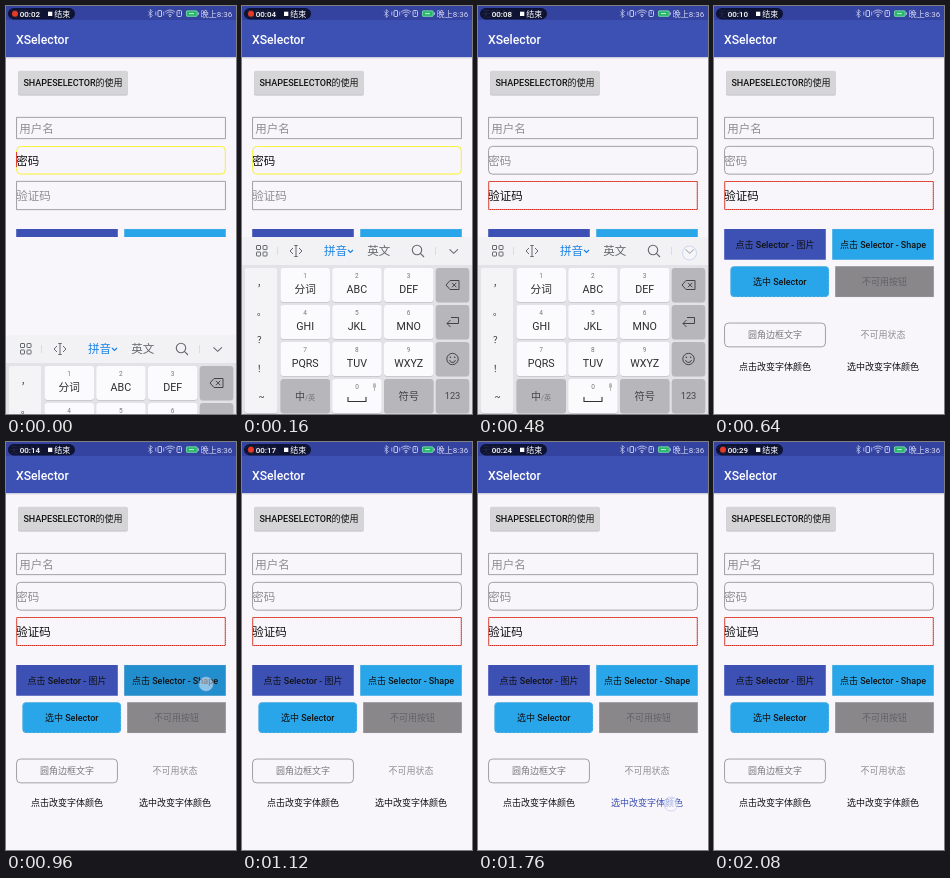
An HTML page with a canvas for the animation above (2.24 s loop, 230x408 px).

```html
<!DOCTYPE html>
<html lang="zh-CN">
<head>
<meta charset="utf-8">
<style>
html, body { margin: 0; width: 100%; height: 100%; overflow: hidden; background: #f8f6fa; }
canvas { display: block; width: 230px; height: 408px; }
</style>
</head>
<body>
<canvas id="stage"></canvas>
<script>
const W = 230, H = 408, STEP = 160, LOOP = 2240;
const FONT = 'Roboto, "Noto Sans CJK SC", "Noto Sans CJK", sans-serif';
const PAPER = '#f8f6fa', INDIGO = '#3d51b5', SKY = '#29a5e9', GREY = '#8a878b', INK = '#111';
const EDGE = '#7d7b80', THIN = 0.7;
const canvas = document.getElementById('stage');
const c = canvas.getContext('2d');
const dpr = window.devicePixelRatio || 1;
canvas.width = W * dpr;
canvas.height = H * dpr;

// One entry per step: seconds on the recorder, its dot, and what is going on.
const steps = [
  { sec: 2, dot: 1, focus: 'pass', kb: 329, caret: 1 },
  { sec: 4, dot: 1, focus: 'pass', kb: 231 },
  { sec: 6, focus: 'code', touch: [146, 191] },
  { sec: 8, focus: 'code', kb: 231, touch: [211.5, 247] },
  { sec: 10, focus: 'code' },
  { sec: 12, dot: 1, focus: 'code', press: 'image', touch: [94, 242] },
  { sec: 14, focus: 'code', press: 'shape', touch: [200, 242] },
  { sec: 17, dot: 1, focus: 'code' },
  { sec: 18, focus: 'code', press: 'select', touch: [104, 277] },
  { sec: 20, dot: 1, focus: 'code', touch: [104, 277], hatch: 1 },
  { sec: 22, focus: 'code', press: 'text1', touch: [87, 361] },
  { sec: 24, focus: 'code', press: 'text2', touch: [193, 362] },
  { sec: 26, focus: 'code', press: 'text2' },
  { sec: 29, dot: 1, focus: 'code' }
];

function text(s, x, midY, size, color, weight = 400, align = 'left') {
  c.font = `${weight} ${size}px ${FONT}`;
  c.textAlign = align;
  c.fillStyle = color;
  c.fillText(s, x, midY + size * 0.37);
}

function rect(x, y, w, h, color) {
  c.fillStyle = color;
  c.fillRect(x, y, w, h);
}

function box(x, y, w, h, r, fill, stroke, width = 1, dash = []) {
  c.beginPath();
  c.roundRect(x, y, w, h, r);
  if (fill) { c.fillStyle = fill; c.fill(); }
  if (stroke) {
    c.beginPath();
    c.roundRect(x + width / 2, y + width / 2, w - width, h - width, r);
    c.strokeStyle = stroke;
    c.lineWidth = width;
    c.setLineDash(dash);
    c.stroke();
    c.setLineDash([]);
  }
}

function line(points, color, width = 1) {
  c.beginPath();
  for (let i = 0; i < points.length; i += 2) c.lineTo(points[i], points[i + 1]);
  c.strokeStyle = color;
  c.lineWidth = width;
  c.stroke();
}

function circle(x, y, r, fill, stroke, width = 1) {
  c.beginPath();
  c.arc(x, y, r, 0, 7);
  if (fill) { c.fillStyle = fill; c.fill(); }
  if (stroke) { c.strokeStyle = stroke; c.lineWidth = width; c.stroke(); }
}

function statusBar(s) {
  const pale = '#c3c9ea';
  rect(0, 0, W, 14, '#3442a0');
  text('无SIM卡', 4, 7.8, 8.5, pale);
  box(2, 2, 67, 11.5, 5.7, 'rgba(8,10,30,.84)');
  if (s.dot) circle(9, 7.7, 3, '#e63a26');
  text('00:' + String(s.sec).padStart(2, '0'), 13.7, 7.8, 8, '#fff', 500);
  rect(42, 5.7, 4.3, 4.3, '#fff');
  text('结束', 48.3, 7.6, 8, '#fff', 500);

  line([142.3, 5.5, 146.3, 9.5, 144.3, 11.5, 144.3, 3.5, 146.3, 5.5, 142.3, 9.5], pale, 0.8);
  box(151.5, 4, 4.5, 7, 0.5, null, pale);
  line([149.8, 5.5, 149.8, 9.5], pale, 0.8);
  line([157.7, 5.5, 157.7, 9.5], pale, 0.8);
  for (const r of [2.5, 5, 7]) {
    c.beginPath();
    c.arc(164, 11, r, -Math.PI * 0.75, -Math.PI * 0.25);
    c.strokeStyle = pale;
    c.lineWidth = 0.9;
    c.stroke();
  }
  circle(164, 10.3, 0.9, pale);
  box(170.5, 4, 5.5, 7, 1, null, pale);
  line([173.25, 5.5, 173.25, 8.2], pale, 0.8);
  box(180, 4.5, 11.5, 6.2, 1, '#24b869', '#8fcfc0', 0.8);
  line([183, 7.6, 188, 7.6], '#d8f2e2', 0.9);
  rect(191.7, 6.4, 1.1, 2.4, pale);
  text('晚上8:36', 194.8, 7.7, 8, '#d5d9f0');
}

function field(y, h, r, label, x, focus) {
  box(10.2, y, 209.6, h, r, null, focus || EDGE, focus ? 1 : THIN);
  if (focus) box(10.2, y, 209.6, h, r, null, 'rgba(255,255,255,.35)', 1, [1, 1]);
  text(label, x, y + h / 2 + 0.5, 11.5, focus ? INK : '#908e93');
}

function button(x, y, w, r, fill, label, color, border, pressed) {
  box(x, y, w, 30.8, r, fill, border, THIN, [2, 2]);
  if (pressed) box(x, y, w, 30.8, r, 'rgba(0,0,40,.14)');
  text(label, x + w / 2, y + 15.9, 9, color, 500, 'center');
}

function page(s) {
  rect(0, 0, W, H, PAPER);
  rect(0, 14, W, 37, INDIGO);
  rect(0, 51, W, 1, '#cfcfdf');
  rect(0, 52, W, 1, '#eae9f0');
  text('XSelector', 10, 33.6, 12.2, '#fff', 500);
  box(12.2, 65.2, 109.4, 24.3, 1.5, '#bcbabd');
  box(12.2, 64.8, 109.4, 23.9, 1.5, '#d5d4d6');
  text('SHAPESELECTOR的使用', 67, 77, 9, INK, 500, 'center');

  field(111, 22, 0, '用户名', 13.3);
  field(140, 28.5, 4, '密码', 10.2, s.focus === 'pass' && '#f5ee1e');
  if (s.caret) rect(10, 146, 1, 15, '#e0402f');
  field(175, 29, 0, '验证码', 10.2, s.focus === 'code' && '#cf2a1c');

  button(10.2, 223, 101.6, 0, INDIGO, '点击 Selector - 图片', INK, null, s.press === 'image');
  button(118.2, 223, 101.6, 0, SKY, '点击 Selector - Shape', INK, '#6fb9dc', s.press === 'shape');
  button(16.4, 260.2, 98.6, 4, SKY, '选中 Selector', INK, '#7fbcd8', s.press === 'select');
  button(121.2, 260.2, 98.6, 0, GREY, '不可用按钮', '#636066', '#a3a0a5', false);

  box(10.2, 316.7, 101.6, 24.5, 4, null, EDGE, THIN);
  text('圆角边框文字', 61, 329, 9, '#7c7a7e', 400, 'center');
  text('不可用状态', 169, 329, 9, '#8f8d92', 400, 'center');
  text('点击改变字体颜色', 61, 360.5, 9, s.press === 'text1' ? INDIGO : INK, 400, 'center');
  text('选中改变字体颜色', 169, 360.5, 9, s.press === 'text2' ? INDIGO : INK, 400, 'center');
}

function key(x, y, w, h, fill = '#fbfafc') {
  box(x, y + 0.8, w, h, 3, '#c3c1c6');
  box(x, y, w, h, 3, fill);
}

function toolbar() {
  const g = '#66686c', blue = '#1a83e6';
  rect(0, 0, W, 28, '#f2f2f5');
  for (const x of [14, 20.5]) for (const y of [8, 14.5]) box(x, y, 5, 5, 0.5, null, g);
  for (const x of [35.5, 193.5]) line([x, 10, x, 18], '#dcdce0');
  line([54, 8.5, 54, 19.5], g);
  line([52.3, 8.5, 55.7, 8.5], g);
  line([52.3, 19.5, 55.7, 19.5], g);
  line([51, 11, 48, 14, 51, 17], g);
  line([57, 11, 60, 14, 57, 17], g);
  text('拼音', 82, 14, 11.5, blue);
  line([106, 13, 108.5, 15.5, 111, 13], blue, 1.2);
  text('英文', 125.3, 14, 11.5, '#66686c');
  circle(175, 13, 4.7, null, g, 1.1);
  line([178.4, 16.4, 182, 20], g, 1.1);
  line([207.5, 12.3, 211.7, 16.3, 215.9, 12.3], g, 1.1);
}

function keyboard(top) {
  const dim = '#77797d', dark = '#2c2c2e', grey = '#b7b6ba';
  const rows = [['分词', 'ABC', 'DEF'], ['GHI', 'JKL', 'MNO'], ['PQRS', 'TUV', 'WXYZ']];
  const cols = [38.5, 90.2, 142], rowY = r => 31 + r * 37;
  rect(0, top, W, H - top, '#e3e2e7');
  c.save();
  c.translate(0, top);
  toolbar();
  key(2.5, 31, 33, 145, '#f4f3f6');
  ['，', '。', '？', '！', '~'].forEach((s, i) =>
    text(s, i < 4 ? 15 : 16.5, 46 + i * 28.5, 9, dark));
  rows.forEach((row, r) => row.forEach((label, i) => {
    key(cols[i], rowY(r), 49.5, 34);
    text(String(r * 3 + i + 1), cols[i] + 24.7, rowY(r) + 8, 6.5, dim, 400, 'center');
    text(label, cols[i] + 24.7, rowY(r) + 20.8, 10.7, dark, 400, 'center');
  }));

  const y = rowY(3);
  cols.forEach((x, i) => key(x, y, 49.5, 34, i === 1 ? undefined : grey));
  text('中', 53, y + 17, 10, '#444');
  text('/英', 63, y + 18, 7.2, '#77757a');
  text('0', 115, y + 8, 6.5, dim, 400, 'center');
  line([106, y + 18, 106, y + 22.5, 124, y + 22.5, 124, y + 18], '#333', 1.1);
  box(131, y + 4, 3, 5, 1.5, '#bbb');
  line([132.5, y + 9, 132.5, y + 12], '#bbb');
  text('符号', 166.7, y + 17, 10.3, '#444', 400, 'center');

  for (let r = 0; r < 4; r++) key(193.8, rowY(r), 33.4, 34, grey);
  text('123', 210.5, y + 17, 9.3, '#444', 400, 'center');
  line([204, 48, 208, 43.5, 217, 43.5, 217, 52.5, 208, 52.5, 204, 48], '#444');
  line([210, 45.8, 214.3, 50.2], '#444');
  line([214.3, 45.8, 210, 50.2], '#444');
  line([209, 80.5, 216.5, 80.5, 216.5, 86.5, 205, 86.5], '#444');
  line([208.5, 83, 205, 86.5, 208.5, 90], '#444');
  circle(210.5, 122, 5.7, null, '#444');
  circle(208.3, 120.3, 0.8, '#444');
  circle(212.7, 120.3, 0.8, '#444');
  c.beginPath();
  c.arc(210.5, 122.5, 3, 0.2, Math.PI - 0.2);
  c.stroke();
  c.restore();
}

function touch([x, y], hatch) {
  if (!hatch) {
    circle(x, y, 7, 'rgba(250,250,255,.5)', 'rgba(165,180,225,.6)', 0.8);
    return;
  }
  c.save();
  c.beginPath();
  c.arc(x, y, 7, 0, 7);
  c.clip();
  for (let d = -14; d <= 14; d += 3) {
    line([x + d - 7, y + 7, x + d + 7, y - 7], 'rgba(190,225,245,.75)', 0.8);
    line([x + d - 7, y - 7, x + d + 7, y + 7], 'rgba(190,225,245,.4)', 0.6);
  }
  c.restore();
}

function draw(now) {
  const s = steps[Math.floor((now % LOOP) / STEP)];
  c.setTransform(dpr, 0, 0, dpr, 0, 0);
  page(s);
  if (s.kb) {
    rect(0, 231, W, H - 231, PAPER);
    keyboard(s.kb);
  }
  statusBar(s);
  if (s.touch) touch(s.touch, s.hatch);
}

let start;
function tick(now) {
  if (start === undefined) start = now;
  draw(Math.max(0, now - start));
  requestAnimationFrame(tick);
}
draw(0);
requestAnimationFrame(tick);
</script>
</body>
</html>
```
